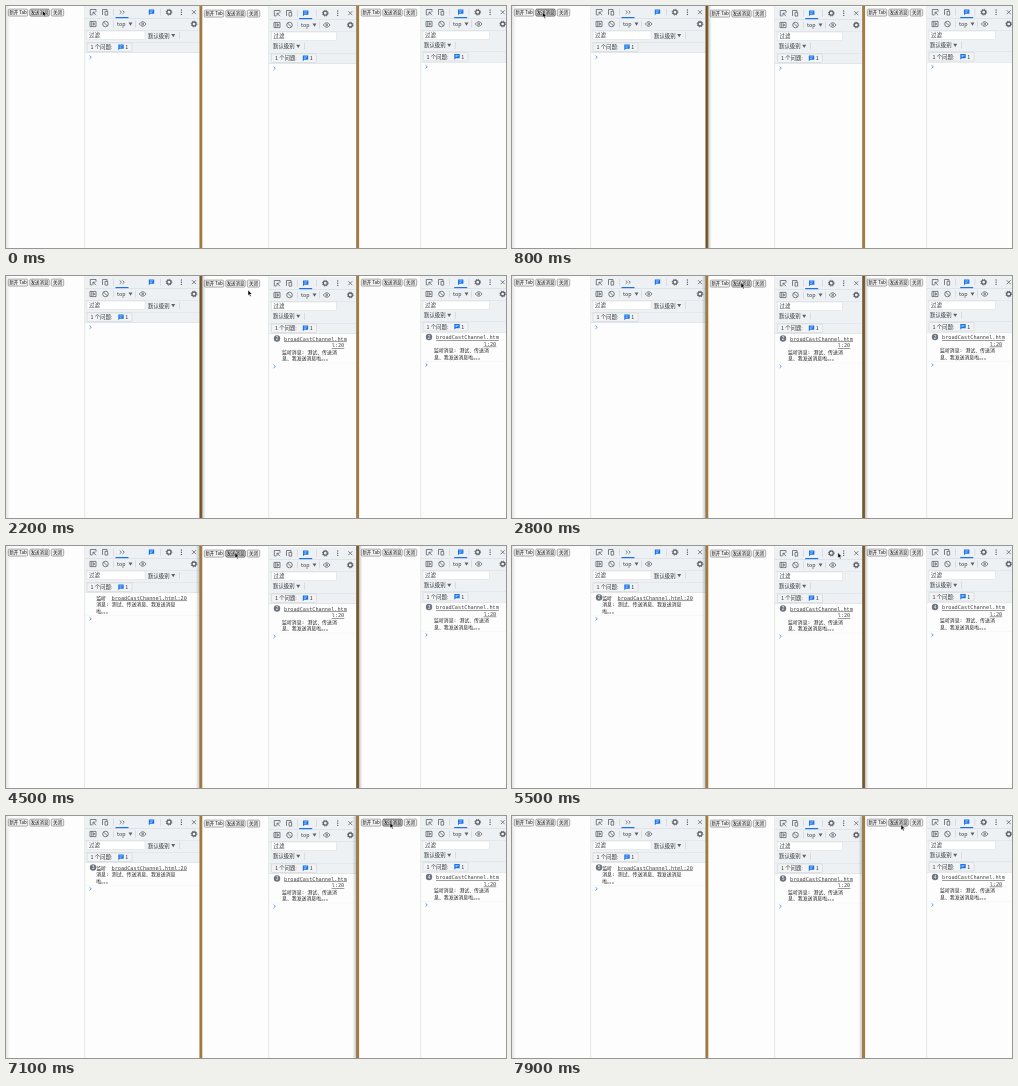
An HTML page that plays this animation: 500 by 242 pixels, repeating every 8 s.

```html
<!DOCTYPE html>
<html lang="zh">
<head>
<meta charset="utf-8">
<style>
html, body { margin: 0; width: 100%; height: 100%; overflow: hidden; background: #fdfdfd; }
svg { display: block; }
text { font-family: "Noto Sans CJK SC", "Noto Sans CJK", sans-serif; font-size: 5.4px; fill: #35383c; white-space: pre; }
.mono { font-family: "DejaVu Sans Mono", "Noto Sans CJK SC", "Noto Sans CJK", monospace; font-size: 4.9px; fill: #222; }
.link { font-size: 5.23px; fill: #444; text-decoration: underline; }
.btn rect { fill: #f0f0f0; stroke: #777; stroke-width: .6; }
.btn text { font-size: 4.4px; fill: #111; text-anchor: middle; font-weight: 500; }
.btn.hover rect { fill: #e2e2e2; stroke: #444; }
.btn.down rect { fill: #cfcfcf; stroke: #222; }
.icon { fill: none; stroke: #5f6368; stroke-width: .8; }
.badge circle { fill: #6c7482; }
.badge text { font-family: "Liberation Sans", sans-serif; font-size: 4.8px; fill: #fff; text-anchor: middle; }
</style>
</head>
<body>
<svg id="stage" width="500" height="242" viewBox="0 0 500 242"></svg>
<script>
const MESSAGE = ["监听消息: 测试、传送消", "息、我发送消息啦。。。"];
const NARROW = ["监听", "消息: 测试、传送消息、我发送消息", "啦。。。"];

// x: page left, d: panel left, r: panel right, y: vertical offset, close: x of the close icon
const windows = [
  { x: 0, d: 79, r: 193.5, y: 0, tab: 116, close: 188, buttons: 2, field: [81, 58], level: 142, bar: 36, wide: true },
  { x: 196.5, d: 263, r: 350.5, y: 1, tab: 299.7, close: 344.3, buttons: 198, field: [265.5, 65], level: 267, bar: 46 },
  { x: 353, d: 415, r: 500, y: 0, tab: 454.7, close: 496.7, buttons: 355, field: [417, 66.5], level: 418, bar: 45.5 }
];

const rect = (x, y, w, h, fill, more = "") => `<rect x="${x}" y="${y}" width="${w}" height="${h}" fill="${fill}" ${more}/>`;
const text = (x, y, s, more = "") => `<text x="${x}" y="${y}" ${more}>${s}</text>`;
const icon = (x, y, d, more = "") => `<path class="icon" transform="translate(${x} ${y})" d="${d}" ${more}/>`;
const bar = (x, y) => rect(x, y - 3.5, .5, 7, "#c6c9cc");
const arrow = (x, y) => `<path d="M${x - 2} ${y - 1.5}h4l-2 3.2z" fill="#5f6368"/>`;
const chat = (x, y) => `<path d="M${x - 2.7} ${y - 2.6}h5.4v4.2h-3.9l-1.5 1.5z" fill="#1a73e8"/>` +
  rect(x - 1.5, y - 1.5, 3, .5, "#fff") + rect(x - 1.5, y - .3, 2, .5, "#fff");
const gear = (x, y) => `<circle cx="${x}" cy="${y}" r="2" fill="none" stroke="#5f6368" stroke-width="1.3"/>` +
  `<circle cx="${x}" cy="${y}" r="2.9" fill="none" stroke="#5f6368" stroke-width=".9" stroke-dasharray="1.14"/>`;
const prompt = (x, y) => icon(x, y, "M-1-1.6L.8 0L-1 1.6", 'style="stroke:#4285f4"');

function button(x, y, w, label) {
  return `<g class="btn">${rect(x + .3, y + .3, w - .6, 7, "", 'rx="1.2"')}${text(x + w / 2, y + 5.4, label)}</g>`;
}

function toolbar(w) {
  const { d, r, y, tab, close } = w, top = y + 6.2, row = y + 18, end = w.bar + y + 10.5;
  let s = rect(d, y, r - d, end - y, "#eef1f4") + rect(d, y + 12, r - d, .5, "#d0d4d9") +
    rect(d, y + 24, r - d, .5, "#d9dce0") + rect(d, w.bar + y, r - d, .5, "#d9dce0") + rect(d, end, r - d, .5, "#d0d4d9");
  s += icon(d + 8, top, "M3 -.5V-2.7H-2.7V2.7H-.5M0 0L3 3M0 2.4V0H2.4") +
    icon(d + 20, top, "M-2.5 2.7V-2.7H2V-1M0 -.8H2.7V2.9H0Z") + bar(d + 28, top);
  s += w.wide ? icon(tab, top, "M-2.3-1.7L-.5 0L-2.3 1.7M.5-1.7L2.3 0L.5 1.7") + chat(close - 42.5, top) : chat(tab, top);
  s += rect(tab - 6.5, y + 11, 13, 1.2, "#1a73e8") + bar(close - 34, top) + gear(close - 25, top);
  for (const k of [-2.2, 0, 2.2]) s += `<circle cx="${close - 12.6}" cy="${top + k}" r=".7" fill="#5f6368"/>`;
  s += icon(close, top, "M-2-2L2 2M2-2L-2 2");
  s += icon(d + 8, row, "M-3-2.6H3V2.6H-3ZM-1.2-2.6V2.6M.3-1.2L1.9 0L.3 1.2Z") +
    icon(d + 20.5, row, "M-2.8 0a2.8 2.8 0 1 0 5.6 0a2.8 2.8 0 1 0-5.6 0M-2-2L2 2") + bar(d + 28, row) +
    text(d + 32, row + 1.9, "top") + arrow(d + 45.5, row) + bar(d + 50.5, row) +
    icon(d + 57.7, row, "M-3.4 0Q0-4.6 3.4 0Q0 4.6-3.4 0ZM-.9 0a.9.9 0 1 0 1.8 0a.9.9 0 1 0-1.8 0") + gear(close, row);
  const [fx, fw] = w.field, levelY = w.wide ? 29.5 : y + 39.3;
  s += rect(fx, y + 25, fw, 8.7, "#fff", 'stroke="#d5d8dc" stroke-width=".5"') + text(fx + 2, y + 31.3, "过滤") +
    text(w.level, levelY + 2, "默认级别") + arrow(w.level + 25.2, levelY) + bar(w.level + 31, levelY);
  const cy = w.bar + y + .9;
  return s + rect(fx, cy, 45, 8.6, "#f1f3f4", 'rx="1" stroke="#c9cdd2" stroke-width=".5"') +
    text(fx + 3.5, cy + 6.2, "1 个问题:") + chat(fx + 34, cy + 4.3) + text(fx + 38.3, cy + 6.2, "1");
}

function log(w) {
  const { d } = w, y = w.bar + w.y + 17.5;
  const line = (x, k, s, cls = "mono") => text(x, y + k * 6.6, s, `class="${cls}"`);
  const body = w.wide
    ? line(d + 26.5, 0, "broadCastChannel.html:20", "mono link") + NARROW.map((s, i) => line(d + 11.2, i, s)).join("")
    : line(d + 15, 0, "broadCastChannel.htm", "mono link") + line(d + 62.7, 1, "l:20", "mono link") +
      MESSAGE.map((s, i) => line(d + 13, i + 2, s)).join("");
  const rows = w.wide ? 3 : 4;
  return `<g class="empty">${prompt(d + 5.5, y - 2.2)}</g>
    <g class="log">${body}${rect(d, y + rows * 6.6 - 4, w.r - d, .4, "#f0f0f0")}${prompt(d + 5.5, y + rows * 6.6 - .5)}</g>
    <g class="badge"><circle cx="${d + 8}" cy="${y - 2}" r="3.2"/>${text(d + 8, y - .3, "")}</g>`;
}

function panel(w) {
  const b = w.buttons, by = w.y + 2.8;
  return `<g class="win">${rect(w.x, 0, w.r - w.x, 242, "#fdfdfd")}${rect(w.d - .5, 0, .6, 242, "#cfe0d2")}
    ${button(b, by, 20, "新开 Tab")}${button(b + 21.5, by, 20, "发送消息")}${button(b + 43, by, 13, "关闭")}
    ${toolbar(w)}${log(w)}</g>`;
}

const fade = (id, a, b) => `<linearGradient id="${id}"><stop stop-opacity="${a}"/><stop offset="1" stop-opacity="${b}"/></linearGradient>`;
const toRight = (x, w) => rect(x, 0, w, 242, "url(#right)");
const toLeft = (x, w) => rect(x - w, 0, w, 242, "url(#left)");
const strip = x => rect(x, 0, 2.6, 242, "#a67c3d") + rect(x, 0, .5, 242, "#7c6640");

const stage = document.getElementById("stage");
stage.innerHTML = `<defs>${fade("right", .35, 0)}${fade("left", 0, .22)}${fade("edge", .1, 0)}</defs>` +
  windows.map(panel).join("") + strip(193.7) + strip(350.5) + rect(0, 0, 4, 242, "url(#edge)") +
  `<g class="glow">${toRight(193.7, 6)}</g><g class="glow">${toLeft(193.7, 4)}${toRight(350.5, 6)}</g>
  <g class="glow">${toLeft(350.5, 4)}</g>
  <path id="cursor" d="M0 0V5.6L1.3 4.5L2.2 6.5L3.2 6.1L2.3 4.1H4Z" fill="#000" stroke="#fff" stroke-width=".5"/>`;

const all = s => [...stage.querySelectorAll(s)];
const wins = all(".win"), glows = all(".glow"), cursor = document.getElementById("cursor");

// time, x, y of the pointer tip
const path = [[0, 36.5, 4.5], [300, 34, 5], [500, 34, 5], [800, 30.5, 6], [1900, 30.5, 6], [2200, 242, 14],
  [2400, 242, 14], [2800, 229, 6.5], [5000, 229, 6.5], [5800, 384, 6.5], [7500, 384, 6.5], [7900, 389, 8.5]];
// time the message arrives, sending window
const sends = [[900, 0], [1600, 0], [3500, 1], [4600, 1], [6800, 2], [7200, 2], [7800, 2]];
const focusTimes = [200, 2600, 6000];

function pointer(t) {
  const i = path.findIndex(p => p[0] > t);
  if (i < 0) return path[path.length - 1].slice(1);
  const [t0, x0, y0] = path[i - 1], [t1, x1, y1] = path[i], k = (t - t0) / (t1 - t0);
  return [x0 + (x1 - x0) * k, y0 + (y1 - y0) * k];
}

const show = (el, on) => el.setAttribute("visibility", on ? "visible" : "hidden");

function draw(t) {
  const [x, y] = pointer(t);
  cursor.setAttribute("transform", `translate(${x} ${y})`);
  const focus = focusTimes.filter(f => f <= t).length - 1;
  glows.forEach((g, i) => show(g, i === focus));
  wins.forEach((el, i) => {
    const count = sends.filter(([at, from]) => at <= t && from !== i).length;
    const part = s => el.querySelector(s);
    show(part(".empty"), !count);
    show(part(".log"), count);
    show(part(".badge"), count > 1);
    part(".badge text").textContent = count;
    const send = el.querySelectorAll(".btn")[1], left = windows[i].buttons + 21.5;
    send.classList.toggle("hover", x > left && x < left + 20 && y < 11);
    send.classList.toggle("down", sends.some(([at, from]) => from === i && t >= at - 100 && t < at));
  });
}

function loop() {
  draw(Math.floor(performance.now() % 8000 / 100) * 100);
  requestAnimationFrame(loop);
}
loop();
</script>
</body>
</html>
```
